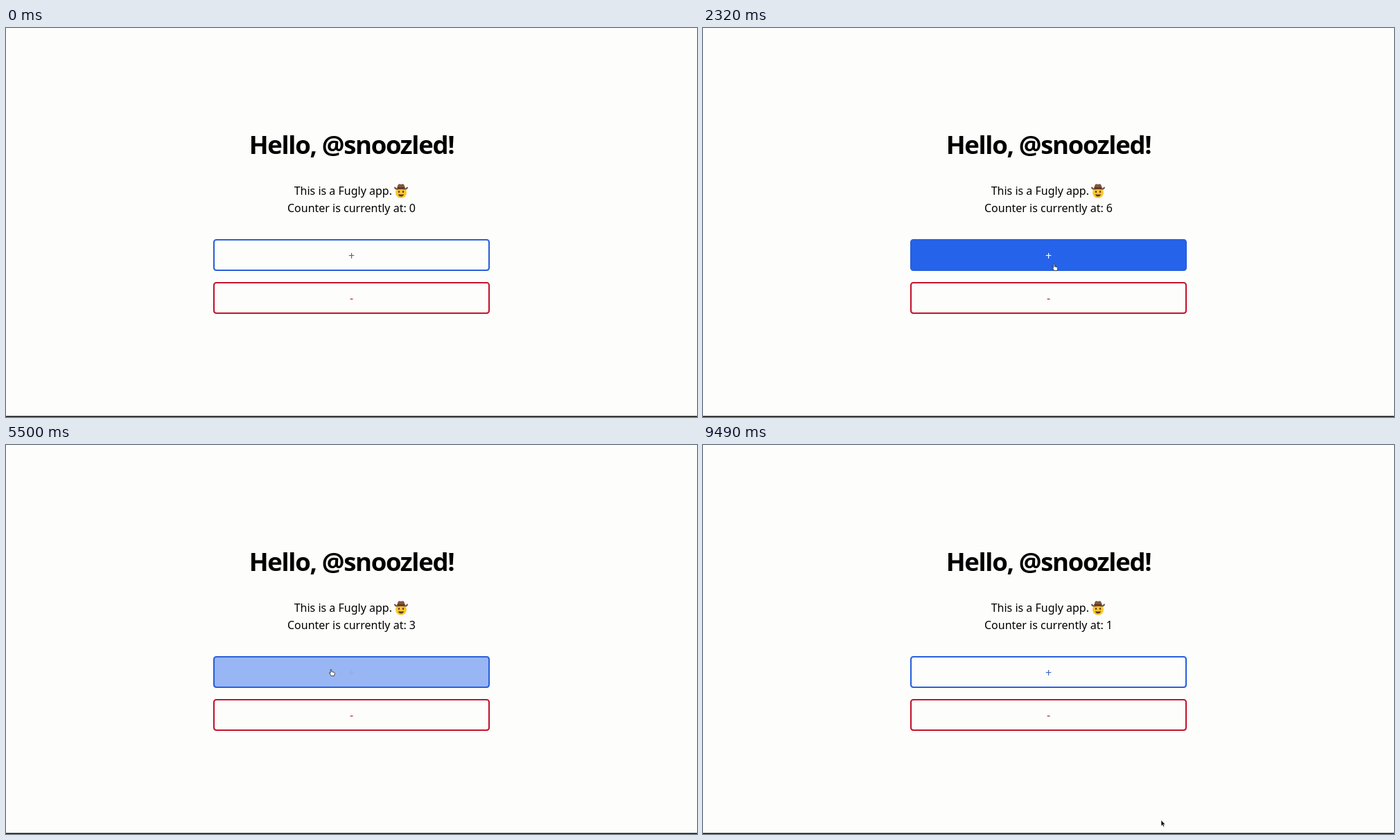
Recreate the animation shown at these times as an HTML page. Size 997 by 562 pixels, loop 9.88 s.

```html
<!DOCTYPE html>
<html lang="en">
<head>
<meta charset="utf-8">
<title>Counter</title>
<style>
  html, body { margin: 0; width: 100%; height: 100%; overflow: hidden; background: #fdfdfc; }
  svg { display: block; width: 997px; height: 562px; }
  text { font-family: "Noto Sans", "Open Sans", sans-serif; font-size: 16px; text-anchor: middle; }
  .title { font-size: 36.5px; font-weight: 700; letter-spacing: -.036em; }
  .button rect { stroke-width: 2.1; }
</style>
</head>
<body>
<svg viewBox="0 0 997 562">
  <text class="title" x="498.5" y="182">Hello, @snoozled!</text>
  <text x="486.3" y="241">This is a Fugly app.</text>
  <text id="counter" x="498.5" y="265.5"></text>

  <g transform="translate(570 235)">
    <circle cy="2.8" r="8" fill="#fcc62c"/>
    <path d="M-4 5Q0 6.2 4 5Q3.4 8.6 0 8.6T-4 5Z" fill="#5b3a25"/>
    <ellipse cx="-3" cy="1.6" rx="1.1" ry="1.5" fill="#4a3324"/>
    <ellipse cx="3" cy="1.6" rx="1.1" ry="1.5" fill="#4a3324"/>
    <g transform="translate(0 -.6)">
      <path d="M-10-4.5Q-8.5-5.5-7-3.2Q0-1 7-3.2Q8.5-5.5 10-4.5Q9.5-.5 5-.8Q0-2.2-5-.8Q-9.5-.5-10-4.5Z" fill="#755039"/>
      <path d="M-5.6-2.6Q-5-9-2.5-9.2Q0-8.2 2.5-9.2Q5-9 5.6-2.6Q0-1-5.6-2.6Z" fill="#80573f"/>
      <path d="M-5.6-2.6L-5.3-4.6Q0-3.2 5.3-4.6L5.6-2.6Q0-1-5.6-2.6Z" fill="#4e342e"/>
    </g>
  </g>

  <g class="button" id="plus">
    <rect x="300" y="306" width="397" height="44" rx="3.5" stroke="#2860dc"/>
    <text x="498.5" y="335">+</text>
  </g>
  <g class="button" id="minus">
    <rect x="300" y="368" width="397" height="44" rx="3.5" stroke="#c2142d"/>
    <text x="498.5" y="395.5">-</text>
  </g>

  <rect y="560.5" width="997" height="1.5" fill="#111"/>

  <g id="cursor">
    <path id="hand" d="M-2.3-4.4Q-1.5-5.4-.7-4.4V-1.4L2.8-.6Q4-.2 3.8 1.2L3 4.6H-1.4L-4-.1Q-3.8-1.2-2.3.3Z"
      fill="#fff" stroke="#222" stroke-width=".8" stroke-linejoin="round"/>
    <path id="arrow" d="M-3-5V3.4L-1.1 1.7L.3 4.6L1.7 3.9L.4 1.2H3Z"
      fill="#111" stroke="#fff" stroke-width=".5"/>
  </g>
</svg>
<script>
const LOOP = 9880, FADE = 120;
const $ = id => document.getElementById(id);

// The cursor visits a button, clicks at a steady pace and moves on.
const visits = [
  { id: 'plus', enter: 600, first: 1201, every: 200, clicks: 8, leave: 2760, x: 508, y: 346 },
  { id: 'minus', enter: 2860, first: 3050, every: 205, clicks: 8, leave: 4680, x: 482.5, y: 386 },
  { id: 'plus', enter: 4750, first: 5009, every: 230, clicks: 5, leave: 6060, x: 470.5, y: 329 },
  { id: 'minus', enter: 6130, first: 6380, every: 230, clicks: 4, leave: 7490, x: 465.5, y: 383 }
];

const stops = [
  { from: 280, to: 280, x: 77, y: 370 },
  ...visits.map(v => ({ from: v.enter + 150, to: v.leave - 90, x: v.x, y: v.y })),
  { from: 8330, to: 8490, x: 34, y: 544 },
  { from: 8720, to: 8960, x: 20, y: 590 }
];

const colors = {
  plus: { step: 1, fill: [37, 99, 235], text: [64, 102, 196] },
  minus: { step: -1, fill: [208, 23, 41], text: [180, 40, 60] }
};
const paper = [253, 253, 252], white = [255, 255, 255];

const clamp = (v, max = 1) => Math.max(0, Math.min(max, v));
const fade = elapsed => 1 - (1 - clamp(elapsed / FADE)) ** 2;
const lerp = (a, b, p) => a + (b - a) * p;
const mix = (a, b, p) => `rgb(${a.map((v, i) => Math.round(lerp(v, b[i], p)))})`;

const clicksBy = (v, t) => clamp(Math.floor((t - v.first) / v.every) + 1, v.clicks);

// Every click redraws the page, so the hover fade starts again.
function fillAmount(id, t) {
  const v = visits.findLast(v => v.id === id && v.enter <= t);
  if (!v) return 0;
  if (t >= v.leave) return 1 - fade(t - v.leave);
  const n = clicksBy(v, t);
  return fade(t - (n ? v.first + (n - 1) * v.every : v.enter));
}

function paintButton(id, amount) {
  const [box, label] = $(id).children;
  box.setAttribute('fill', mix(paper, colors[id].fill, amount));
  label.setAttribute('fill', mix(colors[id].text, white, amount));
}

function cursorAt(t) {
  if (t >= 9490) return [664, 547];
  if (t >= 8960) return [682, 560];
  const i = stops.findLastIndex(s => s.from <= t);
  if (i < 0) return null;
  const a = stops[i], b = stops[i + 1] || a;
  const p = clamp((t - a.to) / (b.from - a.to));
  return [lerp(a.x, b.x, p), lerp(a.y, b.y, p)];
}

const show = (id, visible) => $(id).setAttribute('display', visible ? 'inline' : 'none');

function render(t) {
  for (const id in colors) paintButton(id, fillAmount(id, t));
  const count = visits.reduce((sum, v) => sum + colors[v.id].step * clicksBy(v, t), 0);
  $('counter').textContent = `Counter is currently at: ${count}`;

  const spot = cursorAt(t);
  const hovering = visits.some(v => t >= v.enter && t < v.leave);
  show('cursor', spot);
  show('hand', hovering);
  show('arrow', !hovering);
  if (spot) $('cursor').setAttribute('transform', `translate(${spot})`);
}

const origin = performance.now();
function tick() {
  render((performance.now() - origin) % LOOP);
  requestAnimationFrame(tick);
}
tick();
</script>
</body>
</html>
```
